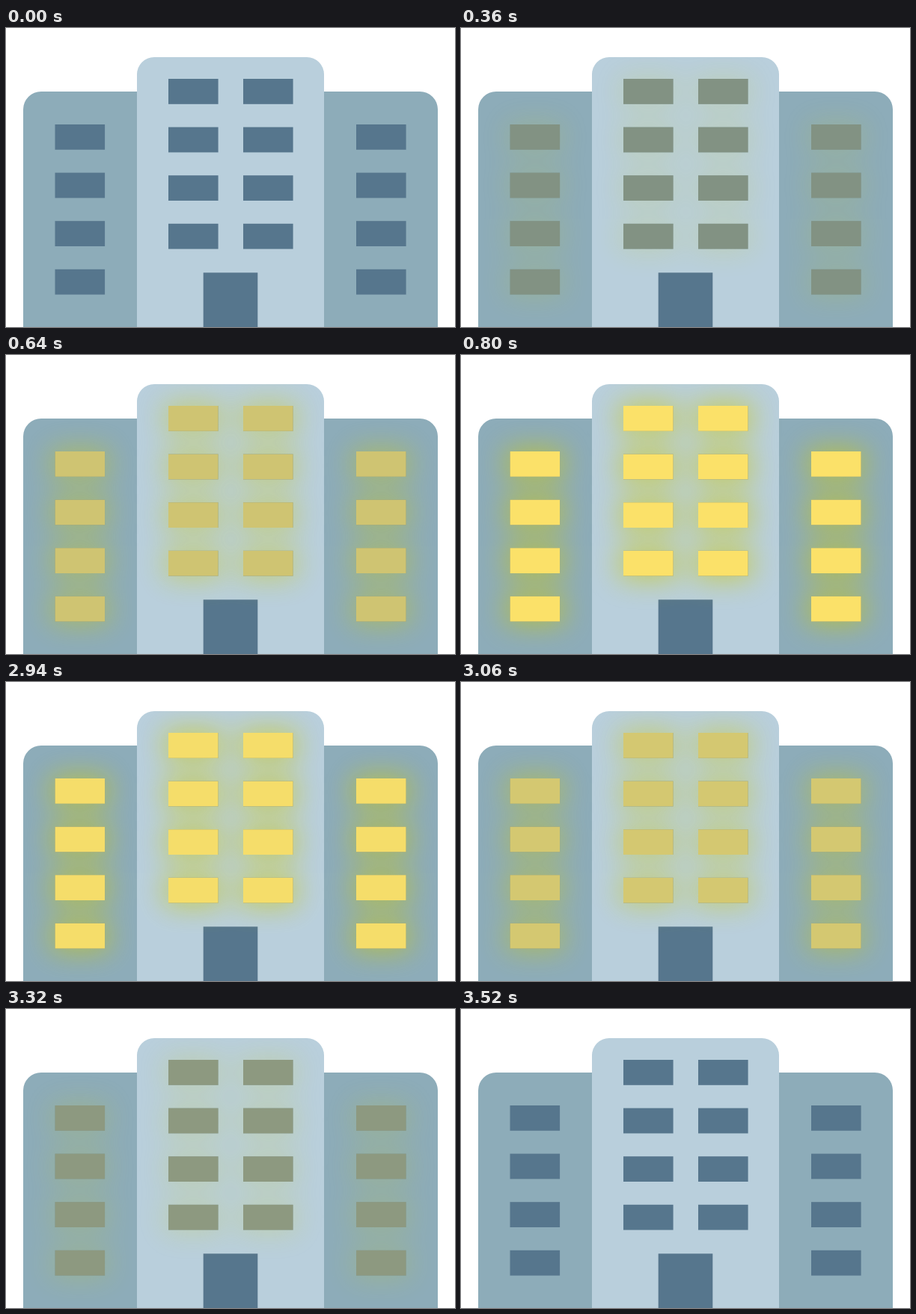
Write an HTML page that moves like this. It is 600x400 px and loops after 4180 ms.

```html
<!DOCTYPE html>
<html lang="en">
<head>
<meta charset="utf-8">
<title>Office lights</title>
<style>
html, body { margin: 0; width: 100%; height: 100%; overflow: hidden; background: #fff; }
svg { display: block; width: 100%; height: 100%; }
</style>
</head>
<body>
<svg viewBox="0 0 600 400">
  <defs>
    <rect id="wings" x="23" y="85" width="554" height="360" rx="24"/>
    <rect id="tower" x="175" y="39" width="250" height="400" rx="23"/>
    <g id="panes"></g>
    <clipPath id="walls"><use href="#wings"/><use href="#tower"/></clipPath>
    <filter id="blur" filterUnits="userSpaceOnUse" x="-60" y="-60" width="720" height="520" color-interpolation-filters="sRGB">
      <feGaussianBlur stdDeviation="18"/>
    </filter>
  </defs>
  <use href="#wings" fill="#8dacb9"/>
  <use href="#tower" fill="#b9cfdc"/>
  <rect x="263.7" y="327.3" width="72.6" height="73" fill="#56768d"/>
  <g clip-path="url(#walls)">
    <g class="lit">
      <use href="#panes" fill="#cdca00" stroke="#cdca00" stroke-width="10" opacity=".57" filter="url(#blur)"/>
    </g>
  </g>
  <use href="#panes" fill="#56768d"/>
  <use href="#panes" class="lit" fill="#fbe169"/>
</svg>
<script>
const LOOP = 4180, STEP = 20, FADE = 600, ON = 200, OFF = 2920;

// Each column of four windows: left edge, top of the first window
const columns = [[65.5, 129], [217, 68], [317, 68], [468, 129]];
document.getElementById('panes').innerHTML = columns.map(([x, top]) =>
  [0, 1, 2, 3].map(row =>
    `<rect x="${x}" y="${top + row * 64.6}" width="66.6" height="33.8"/>`
  ).join('')
).join('');

const lit = document.querySelectorAll('.lit');
const ramp = (t, start) => Math.min(1, Math.max(0, (t - start) / FADE));

function draw() {
  const t = Math.floor(performance.now() % LOOP / STEP) * STEP;
  const level = ramp(t, ON) - ramp(t, OFF);
  lit.forEach(el => el.setAttribute('opacity', level));
  requestAnimationFrame(draw);
}
draw();
</script>
</body>
</html>
```
